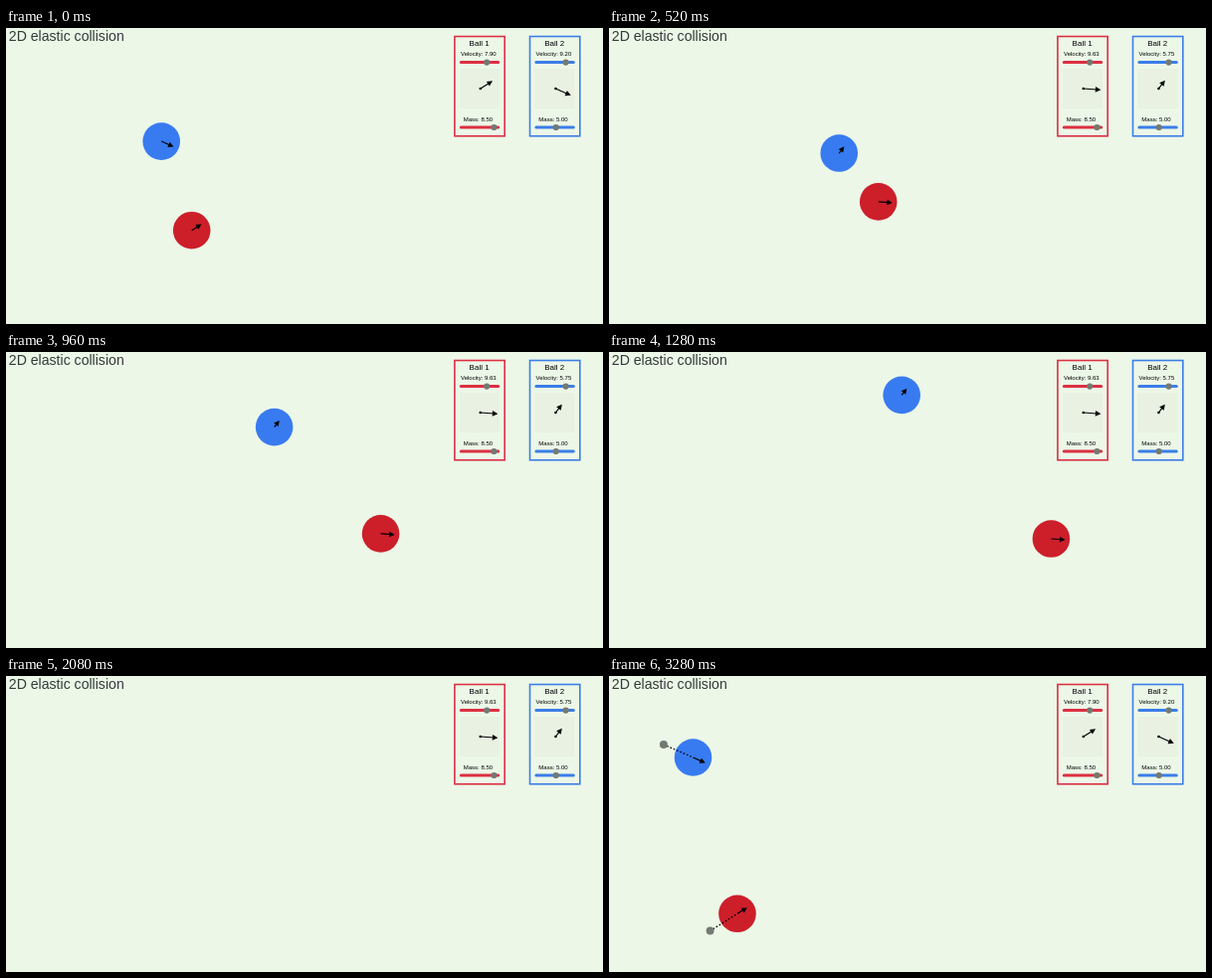
Animation, 600 px wide and 298 px high, one loop 3880 ms. Source, as an HTML page with a canvas:

```html
<!DOCTYPE html>
<html lang="en">
<head>
<meta charset="utf-8">
<title>2D elastic collision</title>
<style>
  html, body { margin: 0; width: 100%; height: 100%; overflow: hidden; background: #ecf7e8; }
  canvas { display: block; width: 600px; height: 298px; }
</style>
</head>
<body>
<canvas id="stage" width="600" height="298"></canvas>
<script>
const canvas = document.getElementById('stage');
const ctx = canvas.getContext('2d');

const LOOP = 3880, FRAME = 40;
const GONE = 2080, RESET = 2920, FADE = 400;
const HIT = 17;            // simulation step of the collision
const RADIUS = 18.8;
const GREY = '#747a73';

// [time in ms, simulation steps done]
const PACE = [[0, 0], [480, 24], [520, 25], [560, 29], [960, 50],
              [1120, 59], [1280, 66], [1600, 82], [2080, 106]];

// Velocities are in pixels per two simulation steps.
const balls = [
  { name: 'Ball 1', fill: '#cc1f2a', line: '#dc3042', panelX: 450,
    from: [186.7, 203.7], start: [129, 239.3], handle: [101.6, 256.6],
    before: [5.9, -3.69], after: [8.47, 0.64], speeds: ['7.90', '9.63'],
    mass: '8.50', knobs: [33.2, 40.4] },
  { name: 'Ball 2', fill: '#387bf0', line: '#3b7ee8', panelX: 525.6,
    from: [156.2, 114.1], start: [84.5, 82], handle: [54.9, 69],
    before: [7.385, 3.3], after: [3.07, -4.03], speeds: ['9.20', '5.75'],
    mass: '5.00', knobs: [37, 27.1] }
];

function stepsAt(time) {
  const i = Math.max(1, PACE.findIndex(p => p[0] >= time));
  const [t0, k0] = PACE[i - 1], [t1, k1] = PACE[i];
  return Math.round(k0 + (k1 - k0) * (time - t0) / (t1 - t0));
}

function positionOf(ball, steps) {
  const pre = Math.min(steps, HIT) / 2, post = Math.max(steps - HIT, 0) / 2;
  return ball.from.map((p, i) => p + ball.before[i] * pre + ball.after[i] * post);
}

function disc(x, y, r, color) {
  ctx.fillStyle = color;
  ctx.beginPath();
  ctx.arc(x, y, r, 0, Math.PI * 2);
  ctx.fill();
}

function line(x1, y1, x2, y2, width, color) {
  ctx.strokeStyle = color;
  ctx.lineWidth = width;
  ctx.beginPath();
  ctx.moveTo(x1, y1);
  ctx.lineTo(x2, y2);
  ctx.stroke();
}

function text(str, x, y, size, color = '#000', align = 'center') {
  ctx.font = `${size}px "Liberation Sans", Arial, sans-serif`;
  ctx.textAlign = align;
  ctx.fillStyle = color;
  ctx.fillText(str, x, y);
}

function arrow(x, y, [vx, vy], length) {
  ctx.save();
  ctx.translate(x, y);
  ctx.rotate(Math.atan2(vy, vx));
  line(0, 0, length - 4, 0, 1.15, '#000');
  ctx.fillStyle = '#000';
  ctx.beginPath();
  ctx.moveTo(length, 0);
  ctx.lineTo(length - 5.5, -2.8);
  ctx.lineTo(length - 5.5, 2.8);
  ctx.fill();
  ctx.restore();
}

function slider(x, y, knob, color) {
  ctx.lineCap = 'round';
  line(x + 7.3, y, x + 44.7, y, 3, color);
  ctx.lineCap = 'butt';
  disc(x + knob, y, 3.1, GREY);
}

function drawPanel(ball, hit) {
  const x = ball.panelX, speed = ball.speeds[+hit];
  ctx.fillStyle = '#e8f1e2';
  ctx.fillRect(x + 6, 41, 40, 40);
  ctx.strokeStyle = ball.line;
  ctx.lineWidth = 1.6;
  ctx.strokeRect(x + 0.9, 8.5, 50.3, 100.3);
  text(ball.name, x + 25.6, 18.4, 8);
  text('Velocity: ' + speed, x + 24.8, 28.4, 6);
  slider(x, 34.6, ball.knobs[0], ball.line);
  disc(x + 26.8, 61, 1.3, '#000');
  arrow(x + 26.8, 61, hit ? ball.after : ball.before, speed * 1.83);
  text('Mass: ' + ball.mass, x + 24.4, 93.5, 6);
  slider(x, 100, ball.knobs[1], ball.line);
}

function drawBall(ball, [x, y], hit) {
  disc(x, y, RADIUS, ball.fill);
  arrow(x, y, hit ? ball.after : ball.before, ball.speeds[+hit] * 1.47);
}

function drawHandle(ball) {
  ctx.setLineDash([1.6, 2]);
  line(...ball.handle, ...ball.start, 1.3, '#000');
  ctx.setLineDash([]);
  disc(...ball.handle, 4, GREY);
}

function draw(time) {
  const waiting = time >= RESET;
  const steps = time < GONE ? stepsAt(time) : HIT;
  const hit = !waiting && steps >= HIT;

  ctx.fillStyle = '#ecf7e8';
  ctx.fillRect(0, 0, 600, 298);
  text('2D elastic collision', 2.8, 13.2, 14.1, '#343a38', 'left');
  balls.forEach(ball => drawPanel(ball, hit));

  if (waiting) {
    const p = Math.min(1, (time - RESET + FRAME) / FADE);
    ctx.globalAlpha = 0.5 - Math.cos(p * Math.PI) / 2;
    for (const ball of balls) {
      drawBall(ball, ball.start, false);
      drawHandle(ball);
    }
    ctx.globalAlpha = 1;
  } else if (time < GONE) {
    balls.forEach(ball => drawBall(ball, positionOf(ball, steps), hit));
  }
}

const began = performance.now();
function tick() {
  const time = (performance.now() - began) % LOOP;
  draw(Math.floor(time / FRAME) * FRAME);
  requestAnimationFrame(tick);
}
tick();
</script>
</body>
</html>
```
